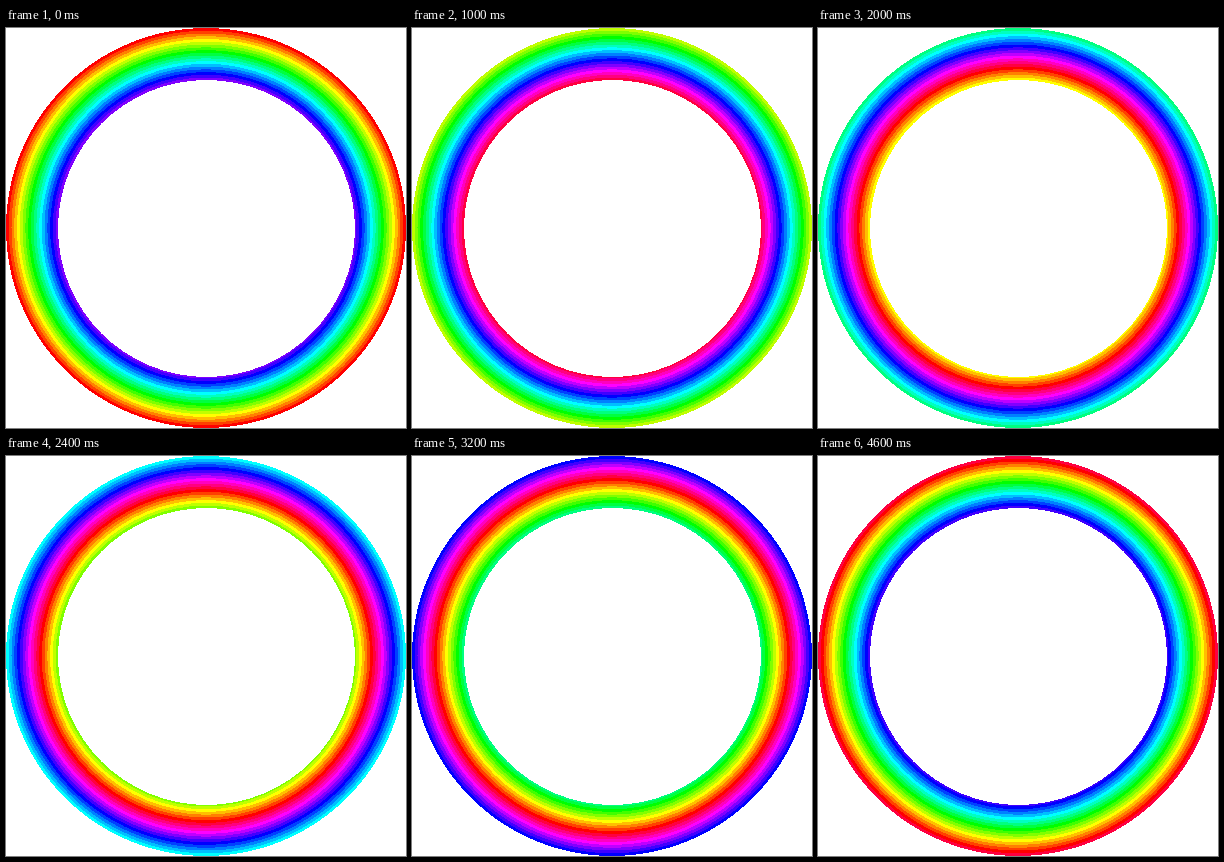
These frames come from a looping animation (400 px wide and 400 px high, 4.8 s). An HTML page:

```html
<!DOCTYPE html>
<html lang="en">
<head>
<meta charset="utf-8">
<title>Rainbow ring</title>
<style>
  html, body { margin: 0; width: 100%; height: 100%; overflow: hidden; background: #fff; }
  svg { display: block; width: 100%; height: 100%; }
</style>
</head>
<body>
<svg viewBox="0 0 400 400" shape-rendering="crispEdges"></svg>
<script>
  const BANDS = 19, BAND_WIDTH = 2.75, HUE_STEP = 15;
  const STEP_MS = 200, STEPS = 24;
  const svg = document.querySelector('svg');

  function addCircle(center, radius, fill) {
    const circle = document.createElementNS('http://www.w3.org/2000/svg', 'circle');
    const attributes = { cx: center, cy: center, r: radius, fill };
    for (const name in attributes) circle.setAttribute(name, attributes[name]);
    svg.append(circle);
    return circle;
  }

  // Nested discs from the outside in, covered by the white middle.
  const bands = Array.from({ length: BANDS }, (_, i) =>
    addCircle(200, 200 - i * BAND_WIDTH, 'red'));
  addCircle(200.5, 148.5, '#fff');

  function render(time) {
    const step = Math.floor(time / STEP_MS) % STEPS;
    bands.forEach((band, i) => {
      const hue = (step + i) * HUE_STEP % 360;
      band.setAttribute('fill', `hsl(${hue}, 100%, 50%)`);
    });
  }

  const start = performance.now();
  function tick() {
    render(performance.now() - start);
    requestAnimationFrame(tick);
  }
  tick();
</script>
</body>
</html>
```
